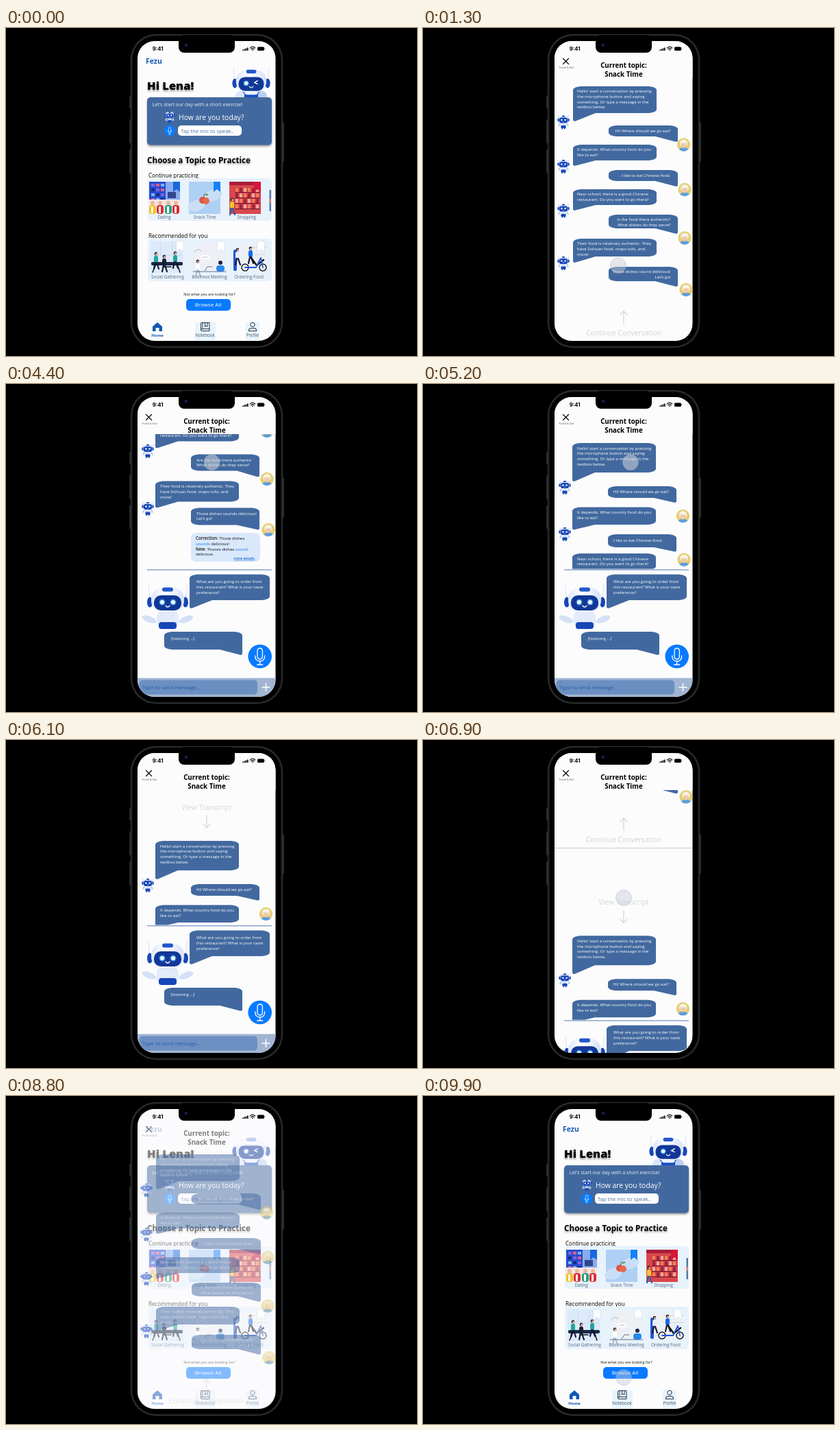
These frames come from a looping animation (600x478 px, 10 s). An HTML page with a canvas:

```html
<!DOCTYPE html>
<html lang="en">
<head>
<meta charset="utf-8">
<title>Language practice app</title>
<style>
html, body { margin: 0; width: 100%; height: 100%; overflow: hidden; background: #000; }
canvas { display: block; }
</style>
</head>
<body>
<canvas id="stage" width="600" height="478"></canvas>
<script>
const c = document.getElementById('stage').getContext('2d');
const BLUE = '#42699f', BRIGHT = '#087aff', NAVY = '#1746b8', PAPER = '#fcfcfd';

// Timing helpers
const clamp = v => Math.max(0, Math.min(1, v));
const ease = (t, a, b) => { const p = clamp((t - a) / (b - a)); return p * p * (3 - 2 * p); };
const mix = (a, b, p) => a + (b - a) * p;

// Drawing helpers
function text(s, x, y, size, color = '#000', weight = 400, align = 'left', family = 'Open Sans') {
  c.font = `${weight} ${size}px "${family}", sans-serif`;
  c.textAlign = align;
  c.fillStyle = color;
  c.fillText(s, x, y);
}
function lines(list, x, y, color, align) {
  list.forEach((s, i) => text(s, x, y + i * 7.75, 6.14, color, 400, align));
}
function rect(x, y, w, h, color, r = 0) {
  c.fillStyle = color;
  c.beginPath();
  c.roundRect(x, y, w, h, r);
  c.fill();
}
function oval(x, y, rx, ry, color, tilt = 0) {
  c.fillStyle = color;
  c.beginPath();
  c.ellipse(x, y, rx, ry, tilt, 0, 7);
  c.fill();
}
function stroke(d, color, width = 1) {
  c.strokeStyle = color;
  c.lineWidth = width;
  c.lineCap = c.lineJoin = 'round';
  c.stroke(new Path2D(d));
}
function shape(d, color) {
  c.fillStyle = color;
  c.fill(new Path2D(d));
}
function at(x, y, s, draw) {
  c.save();
  c.translate(x, y);
  c.scale(s, s);
  draw();
  c.restore();
}
function clipped(x, y, w, h, draw) {
  c.save();
  c.beginPath();
  c.rect(x, y, w, h);
  c.clip();
  draw();
  c.restore();
}
function shadowed(color, blur, dy, draw) {
  c.save();
  c.shadowColor = color;
  c.shadowBlur = blur;
  c.shadowOffsetY = dy;
  draw();
  c.restore();
}

// Speech bubble; the tail hangs from the lower left or lower right corner
function bubble(x, y, w, h, tail, right) {
  c.save();
  c.translate(right ? x + w : x, y);
  if (right) c.scale(-1, 1);
  shape(`M0 5Q1 1 11 0H${w - 11}Q${w - 1} 1 ${w} 5V${h - 5}Q${w - 1} ${h - 1} ${w - 11} ${h}` +
    `H33L4 ${tail - .5}Q0 ${tail + .5} 0 ${tail - 2}Z`, BLUE);
  c.restore();
}

function miniBot(x, y, s = 1) {
  at(x, y, s, () => {
    stroke('M-6-5L-7.5-9M6-5L7.5-9', '#a9b9dc', .6);
    oval(-7, -3, 1.8, 2.6, NAVY);
    oval(7, -3, 1.8, 2.6, NAVY);
    rect(-6.5, -9, 13, 11, '#dbe6fb', 4);
    rect(-6, -6.5, 12, 8, NAVY, 3);
    oval(-2.6, -3, 1.2, 1.3, '#fff');
    oval(2.6, -3, 1.2, 1.3, '#fff');
    stroke('M-1-.3Q0 .6 1-.3', '#fff', .5);
    rect(-2, -9.5, 4, 2, NAVY, 1);
    oval(-6, 4, 1.3, 2.6, '#b9cbee', .5);
    oval(6, 4, 1.3, 2.6, '#b9cbee', -.5);
    rect(-4, 2.5, 8, 6.5, '#d5e1f8', 2.5);
    rect(-3.6, 5, 7.2, 4, NAVY, 1.5);
    rect(-2.8, 8.5, 2, 2, NAVY, 1);
    rect(.8, 8.5, 2, 2, NAVY, 1);
  });
}

function bigBot(x, y, s, wink) {
  at(x, y, s, () => {
    if (wink) {
      oval(0, 27, 21, 13, '#1b4fc4');
      oval(-18, 25, 7, 8, '#dbe6fa', .5);
      oval(18, 25, 7, 8, '#bcd0f4', -.5);
      rect(-11, 14, 22, 9, '#eaf0fc', 5);
    } else {
      oval(-27, 30, 11, 4.5, '#d4e0f6', .35);
      oval(27, 30, 11, 4.5, '#d4e0f6', -.35);
      rect(-16, 16, 32, 28, '#e3ebfa', 11);
      rect(-13, 34, 26, 10, NAVY, 4);
    }
    stroke('M-26 3L-28-19M26 3L28-19', '#cbd8f0', .8);
    oval(-26, 5, 4, 7.5, NAVY);
    oval(26, 5, 4, 7.5, NAVY);
    const skin = c.createLinearGradient(-24, 0, 24, 0);
    skin.addColorStop(0, '#dce6fa');
    skin.addColorStop(.4, '#fff');
    skin.addColorStop(1, '#d6e1f7');
    rect(-24, -16, 48, 35, skin, 16);
    rect(-8, -16.5, 16, 6, '#2358ca', 3);
    rect(-20, -5, 40, 22, '#123797', 10);
    oval(-8, 5, 4.5, 4.5, '#3e8ce8');
    oval(-8, 5, 3, 3, '#eaffff');
    if (wink) stroke('M10 1L5 4L10 6', '#fff', 1.5);
    else {
      oval(8, 5, 4.5, 4.5, '#3e8ce8');
      oval(8, 5, 3, 3, '#eaffff');
    }
    stroke('M-3 10Q0 14 3 10', '#fff', 1.3);
  });
}

function avatar(x, y) {
  oval(x, y, 9.7, 9.7, '#e5cf72');
  c.save();
  c.beginPath();
  c.arc(x, y, 9.7, 0, 7);
  c.clip();
  oval(x, y + 9, 7.5, 5, '#5b9ede');
  oval(x, y - 2, 5.8, 5.6, '#f4efdf');
  oval(x, y, 4, 5, '#f0c9a8');
  oval(x, y - 4, 4.5, 2, '#f7f2e6');
  c.restore();
}

function mic(x, y, s) {
  at(x, y, s, () => {
    c.strokeStyle = '#fff';
    c.lineWidth = 1.3;
    c.beginPath();
    c.roundRect(-3.7, -12, 7.4, 16, 3.7);
    c.stroke();
    stroke('M-7-1Q-7 7 0 7Q7 7 7-1M0 7V12M-4 12H4', '#fff', 1.3);
  });
}

function person(x, y, shirt, legs = '#111a3a') {
  oval(x, y, 2.3, 2.5, '#1a1a22');
  oval(x + .5, y + .7, 1.5, 1.7, '#e9ae91');
  rect(x - 3, y + 3, 6, 10, shirt, 2.5);
  stroke(`M${x - 1} ${y + 13}l-2 9M${x + 1} ${y + 13}l3 9`, legs, 2.2);
}

const flag = (x, y, color, edge) => {
  const d = `M${x} ${y}h10v15l-5-4l-5 4Z`;
  shape(d, color);
  if (edge) stroke(d, edge, .6);
};

function dating() {
  rect(209, 224, 45, 47, '#274bd0');
  rect(233, 224, 21, 26, '#88aced');
  for (let i = 0; i < 12; i++) {
    const x = 212 + i % 3 * 7, y = 227 + (i / 3 | 0) * 7;
    rect(x, y, 5, 4, ['#8263d8', '#e05b88', '#78b7f5', '#172a75'][i % 4]);
  }
  rect(236, 239, 12, 9, '#31458f');
  rect(209, 250, 45, 21, '#f4e5e5');
  [[214, '#f0c321'], [225, '#d92c35'], [237, '#25a184'], [248, '#d92c35']].forEach(([x, col]) => {
    oval(x, 255, 3, 3, '#f0b695');
    rect(x - 5, 258, 10, 13, col, 4);
    rect(x - 2, 260, 3, 10, '#fff');
  });
  flag(244, 224, '#1769dc');
}

function snack() {
  rect(267, 224, 46, 47, '#afd0f5');
  oval(278, 259, 13, 8, '#c9dff7', -.3);
  oval(302, 244, 14, 8, '#c9dff7', -.3);
  oval(287, 251, 5, 5, '#de5540');
  oval(292, 252, 5, 5, '#e56a4b');
  stroke('M289 247Q288 243 291 241', '#67452f', 1);
  oval(293, 243, 2.5, 1.1, '#4a8b4d', -.4);
  flag(303, 224, '#1681f4');
}

function shopping() {
  rect(326, 224, 46, 47, '#d9474d');
  rect(326, 224, 46, 5, '#a91d3a');
  for (let row = 0; row < 4; row++) {
    rect(334, 239 + row * 8, 37, 1.3, '#7a1830');
    for (let i = 0; i < 6; i++)
      rect(335 + i * 6, 233 + row * 8, 4, 6, ['#f17d55', '#992440', '#f0a99d'][(i + row) % 3], 1);
  }
  person(330, 250, '#f3c42c', '#315aa9');
  flag(362, 224, '#d81538');
}

function gathering() {
  rect(211, 311, 48, 46, '#dceafa');
  stroke('M214 331H256M226 311V331M243 311V331', '#c2d4e9', .7);
  rect(212, 341, 46, 5, '#172848', 2);
  person(219, 329, '#23a397');
  person(231, 333, '#15222e');
  person(247, 328, '#23a397');
  stroke('M214 356l5-12M254 356l-4-12M229 348h12', '#111', 1.5);
  flag(249, 311, '#fff', '#d0dbea');
}

function meeting() {
  oval(297, 333, 24, 20, '#eef0f5');
  rect(284, 331, 13, 6, '#fff', 3);
  stroke('M287 334h7M275 327q4-8 10-2', '#8d99aa', .7);
  person(280, 340, '#fff', '#aebbd0');
  oval(313, 342, 3, 3, '#1b2743');
  rect(307, 346, 12, 9, '#2688ec', 4);
  stroke('M273 355H321M290 354l4-6h7', '#46546c', .8);
  flag(309, 311, '#fff', '#d0dbea');
}

function ordering() {
  rect(332, 316, 50, 37, '#edf1f6');
  stroke('M352 320H381M352 330H380', '#cbd4df', 1);
  rect(332, 323, 5, 31, '#2058d5', 2);
  person(338, 323, '#e8edf5');
  person(357, 321, '#1268ec');
  stroke('M358 335L366 346L376 338', '#111', 2.4);
  c.strokeStyle = '#181a22';
  c.lineWidth = 1.5;
  [349, 375].forEach(x => { c.beginPath(); c.arc(x, 349, 5, 0, 7); c.stroke(); });
  stroke('M349 349L365 349L372 335L375 349', '#2058d5', 1.8);
  flag(367, 311, '#fff', '#d0dbea');
}

function home() {
  rect(192, 19, 202, 437, PAPER);
  text('Fezu', 204, 52, 10.5, '#1757b5', 700);
  clipped(320, 55, 74, 47, () => bigBot(358, 76, .92, true));
  shadowed('#0007', 3, 2, () => text('Hi Lena!', 206, 90, 16.5, '#000', 800));
  shadowed('#0006', 3, 2, () => rect(206, 101, 182, 69.5, BLUE, 5));
  text('Let’s start our day with a short exercise!', 213.5, 114, 7.2, '#e9eef6');
  miniBot(239, 130, .85);
  text('How are you today?', 252, 133.5, 10.4, '#fff');
  oval(239, 149.7, 8, 8, BRIGHT);
  mic(239, 149.7, .43);
  rect(251, 142, 93, 15, '#fff', 5);
  text('Tap the mic to speak..', 255, 152.5, 7.7, '#486ea4');
  shadowed('#0005', 3, 2, () => text('Choose a Topic to Practice', 206, 197, 11.7, '#000', 700));

  text('Continue practicing', 208, 217.5, 8.07);
  rect(207, 219, 181, 62, '#e7f2fb', 5);
  dating();
  snack();
  shopping();
  rect(384.5, 236, 2.5, 31, '#5578a8');
  rect(384.5, 249, 2.5, 6, '#dd8a6a');
  text('Recommended for you', 208, 305.5, 8.1);
  rect(207, 307, 181, 62, '#e7f2fb', 5);
  gathering();
  meeting();
  ordering();
  [['Dating', 231, 277.5], ['Snack Time', 290, 277.5], ['Shopping', 351, 277.5],
   ['Social Gathering', 236, 365], ['Business Meeting', 297, 365], ['Ordering Food', 354.5, 365]]
    .forEach(([s, x, y]) => text(s, x, y, 6.3, '#53657d', 400, 'center'));

  text('Not what you are looking for?', 297, 389.5, 5.5, '#111', 400, 'center');
  rect(263, 395, 65, 17, BRIGHT, 5);
  text('Browse All', 295, 406.4, 8, '#fff', 400, 'center');

  rect(276, 428.5, 30, 27, '#e8f4fc');
  rect(350, 428.5, 20, 27, '#e8f4fc');
  shape('M214 435L221 429L228 435V442H223.5V437H218.5V442H214Z', '#1057b5');
  stroke('M286 429.5H297V441.5H286Q284.5 441.5 284.5 440V431Q284.5 429.5 286 429.5M287 430V438.5H297' +
    'M284.5 440Q284.5 438.5 287 438.5M290.5 430V435.5L292.3 434L294 435.5V430', '#263449', 1);
  c.beginPath();
  c.arc(360, 432.3, 3.2, 0, 7);
  c.stroke();
  stroke('M354.5 441.5V440Q355 437.5 358 437.5H362Q365 437.5 365.5 440V441.5Z', '#263449', 1.1);
  text('Home', 221, 450, 6, '#1057b5', 700, 'center');
  text('Notebook', 290.5, 450, 6.2, '#44546a', 400, 'center');
  text('Profile', 360, 450, 6.2, '#44546a', 400, 'center');
}

function header() {
  rect(192, 19, 202, 54, PAPER);
  stroke('M204.5 44.5L212.5 52.5M212.5 44.5L204.5 52.5', '#111', 1.4);
  text('Finish & Exit', 209.5, 58.5, 3.9, '#555', 400, 'center');
  text('Current topic:', 293, 58, 9.8, '#000', 700, 'center');
  text('Snack Time', 293, 71, 9.8, '#000', 700, 'center');
}

const HELLO = ['Hello! start a conversation by pressing', 'the microphone button and saying',
  'something. Or type a message in the', 'textbox below.'];
const DEPENDS = ['It depends. What country food do you', 'like to eat?'];
const NEAR = ['Near school, there is a good Chinese', 'restaurant. Do you want to go there?'];
const LOCAL = ['Their food is relatively authentic. They', 'have Sichuan food, mapo tofu, and', 'more!'];
const WHERE = ['Hi! Where should we go eat?'];
const LIKE = ['I like to eat Chinese food.'];
const SERVE = 'What dishes do they serve?';

// Each row: lines, side (1 = right), top, height, tail, first baseline, portrait x and y
const FULL = [
  [HELLO, 0, 85, 39, 51, 94.2, 205, 137], [WHERE, 1, 142, 16, 24, 152, 380.5, 170],
  [DEPENDS, 0, 170, 23, 31, 179.3, 205, 201.5], [LIKE, 1, 207, 16, 24, 216.5, 382, 235.5],
  [NEAR, 0, 235, 23, 31, 244, 205, 266], [['Is the food there authentic?', SERVE], 1, 272, 20, 28, 281, 382, 306],
  [LOCAL, 0, 307, 26, 35, 316, 205, 342.5],
  [['Those dishes sound delicious!', 'Let’s go!'], 1, 348, 21, 29, 357, 384, 381.5]
];
const SPLIT = [
  [HELLO, 0, 86, 43, 56, 95.7, 207, 150.5], [WHERE, 1, 149, 17, 24, 158.8, 379.5, 192.5],
  [DEPENDS, 0, 179.5, 25.5, 33, 189.2, 207, 218.5], [LIKE, 1, 219, 19, 25.5, 229.5, 381, 256],
  [NEAR, 0, 247, 24, 34, 256.7, 207, 285], [['Are the food there authentic', SERVE], 1, 290, 24, 33, 300, 381, 326],
  [LOCAL, 0, 329, 30, 39, 338.7, 207, 369],
  [['Those dishes sounds delicious!', 'Let’s go!'], 1, 368, 25, 32, 378, 383, 400]
];

function chat(rows, split) {
  rows.forEach(([words, right, y, h, tail, base, px, py]) => {
    const x = (right ? 271 : 219) - split;
    bubble(x, y, right ? 101 - split : 122, h, tail, right);
    if (right && !split) lines(words, 361.5, base, '#fff', 'right');
    else lines(words, right ? 278 : 225, base, '#fff');
    right ? avatar(px, py) : miniBot(px, py);
  });
}

function transcript(scroll) {
  rect(192, 19, 202, 437, PAPER);
  at(0, -scroll, 1, () => chat(FULL, 0));
  stroke('M293 430.5V412.5M288 418L293 412.5L298 418', '#d5d5d7', 1.2);
  text('Continue Conversation', 293, 447.5, 10.3, '#d2d2d4', 400, 'center');
}

// Draws pieces of a line in turn, each with its own colour and weight
function runs(list, x, y) {
  list.forEach(([s, color = '#111', weight = 400]) => {
    text(s, x, y, 6.14, color, weight);
    x += c.measureText(s).width;
  });
}

function split(scroll) {
  rect(192, 19, 202, 437, PAPER);
  clipped(192, 73, 202, 196.5, () => at(0, -scroll, 1, () => {
    text('View Transcript', 293, 41, 10.4, '#d5d5d7', 400, 'center');
    stroke('M293 49V67M288 62L293 67L298 62', '#d5d5d7', 1.2);
    chat(SPLIT, 1);
    rect(270, 404.5, 101, 42, '#d9e9fb', 7);
    runs([['Correction', '#111', 600], [': Those dishes']], 277, 414.5);
    runs([['sounds', BRIGHT], [' delicious!']], 277, 422.3);
    runs([['New', '#111', 600], [': Thoses dishes '], ['sound', BRIGHT]], 277, 430);
    runs([['delicious']], 277, 437.5);
    text('more details', 363, 443.5, 5.1, '#1769d2', 600, 'right');
    stroke('M333.5 444.6H363', '#1769d2', .5);
  }));
  rect(206, 270, 182, 1.5, '#8ba6ce');
  bubble(268, 277.5, 117, 37.5, 49.5);
  lines(['What are you going to order from', 'this restaurant? What is your taste', 'preference?'], 278, 290, '#fff');
  bigBot(236, 313, 1);
  bubble(231, 361, 114, 26, 34, true);
  lines(['[listening ...]'], 241, 372.5, '#fff');
  oval(370.7, 397, 17.3, 17.3, BRIGHT);
  mic(370.7, 397, 1);
  rect(192, 428.5, 202, 28, '#a1b5d3');
  rect(194.5, 431.5, 172.5, 21, '#6c8fc2', 5);
  text('Type to send message...', 199, 444.5, 7.7, '#225cac');
  stroke('M379.5 436.5V447.5M374 442H385', '#fff', 1.4);
}

function status() {
  rect(252, 10, 82, 26, '#000', 8);
  oval(263, 25, 2.7, 2.7, '#0a1030');
  oval(263, 25, 1.2, 1.2, '#1d2d78');
  text('9:41', 221.7, 33, 7.7, '#000', 700, 'center', 'Inter');
  for (let i = 0; i < 4; i++) rect(345 + i * 2.3, 31.5 - i, 1.7, 1.5 + i, '#000', .4);
  stroke('M356.3 29Q360 25.8 363.7 29M357.8 30.8Q360 29 362.2 30.8', '#000', 1.1);
  oval(360, 32.4, .8, .8, '#000');
  rect(367, 27.5, 10, 5.5, '#000', 1.6);
  rect(377.6, 29.3, .8, 2, '#555', .4);
}

function phone() {
  [[180, 99, 18], [180, 133, 35], [180, 177, 34], [403, 137, 58]]
    .forEach(([x, y, h]) => rect(x, y, 3, h, '#292a2b', 1));
  rect(182, 9, 222, 457, '#353738', 37);
  rect(183.2, 10.2, 219.6, 454.6, '#141516', 36);
  rect(185, 12, 216, 451, '#000', 34);
  rect(274, 12.5, 38, 2, '#1b1c1d', 1);
}

function touch(x, y, alpha) {
  if (alpha <= 0) return;
  c.save();
  c.globalAlpha = alpha;
  oval(x, y, 11.5, 11.5, 'rgba(196,204,216,.6)');
  c.strokeStyle = 'rgba(160,170,185,.6)';
  c.lineWidth = .8;
  c.stroke();
  c.restore();
}

// Start, end, first point, last point
const TOUCHES = [
  [150, 800, 290, 250, 290, 250], [1200, 2150, 285, 346, 287, 250],
  [2500, 3150, 290, 400, 292, 250], [4200, 4850, 300, 98, 304, 225],
  [5020, 5750, 303, 110, 303, 176], [6350, 7000, 293, 120, 293, 230],
  [8000, 8700, 208.5, 49, 208.5, 49], [9750, 10000, 293, 410, 293, 410]
];

function screen(t) {
  if (t < 1000 || t >= 8600) {
    home();
    const shown = t < 5000 ? ease(t, 600, 1000) : 1 - ease(t, 8600, 9000);
    if (shown > 0) {
      c.globalAlpha = shown;
      transcript(0);
      header();
      c.globalAlpha = 1;
    }
  } else {
    const open = ease(t, 2600, 3500) - ease(t, 6600, 7400);
    const pushed = t < 5000 ? 45 * ease(t, 1400, 2200) : 0;
    const scroll = mix(187.5, 0, ease(t, 4400, 5100)) - 61 * ease(t, 5200, 5900);
    if (open < 1) at(0, -437 * open, 1, () => transcript(pushed));
    if (open > 0) at(0, 437 * (1 - open), 1, () => split(scroll));
    header();
  }
  TOUCHES.forEach(([a, b, x, y, x2, y2]) => {
    const p = ease(t, a + 100, b - 100);
    touch(mix(x, x2, p), mix(y, y2, p), Math.min(clamp((t - a) / 130), clamp((b - t) / 130)));
  });
}

function frame(now) {
  const t = Math.floor(now % 10000 / 100) * 100;
  rect(0, 0, 600, 478, '#000');
  phone();
  c.save();
  c.beginPath();
  c.roundRect(192, 19, 201.5, 437, 25);
  c.clip();
  screen(t);
  c.restore();
  status();
  requestAnimationFrame(frame);
}
requestAnimationFrame(frame);
</script>
</body>
</html>
```
